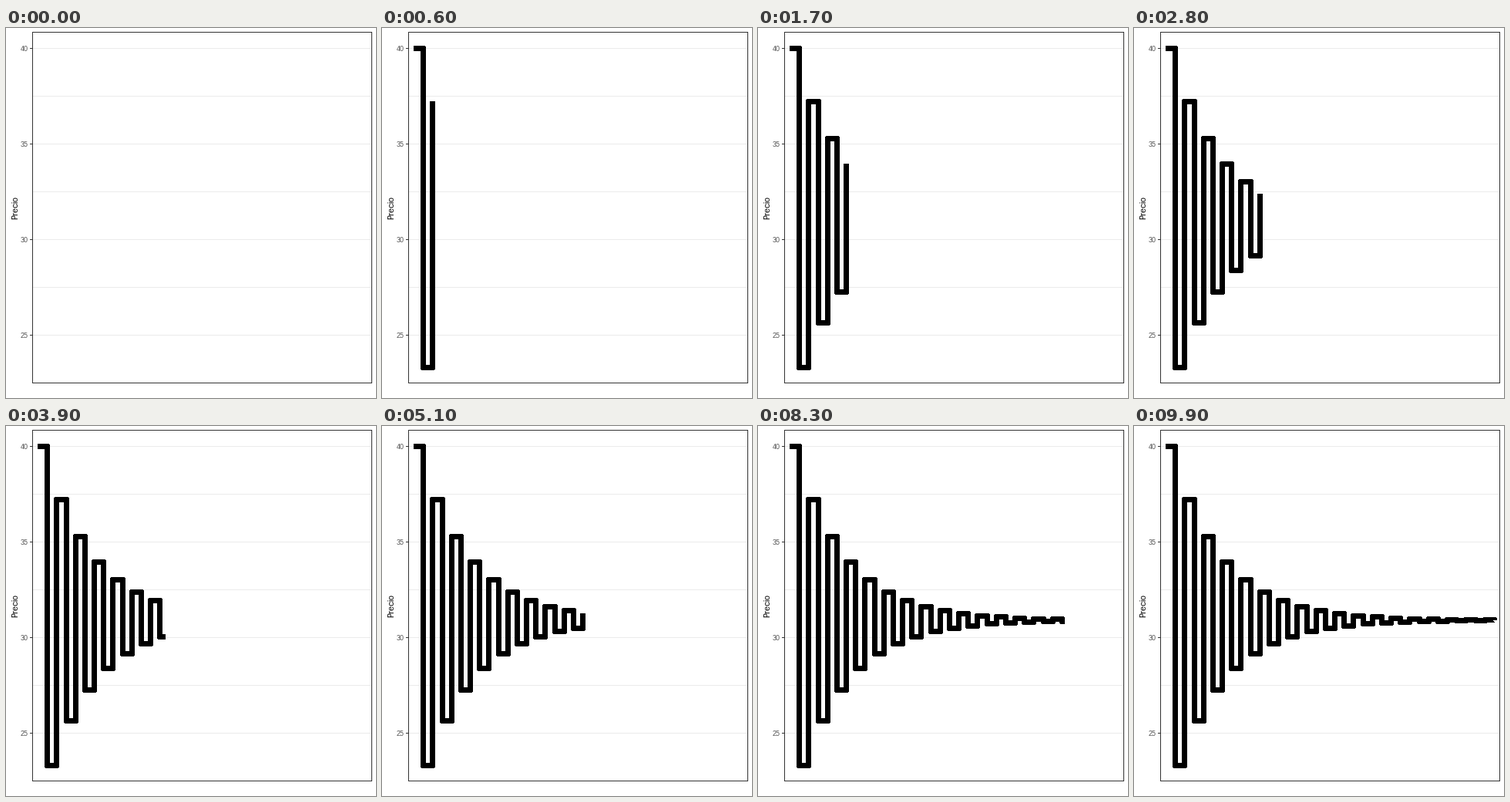
A matplotlib script that plays this animation: 480 px wide and 480 px high, repeating every 10 s.

```python
import numpy as np
import matplotlib.pyplot as plt
from matplotlib.animation import FuncAnimation
from matplotlib.patches import Rectangle

SIZE, DPI = 480, 96
PX = 72 / DPI  # points per pixel
FRAMES, INTERVAL = 100, 100
PERIODS = 35
LEFT, TOP, RIGHT, BOTTOM = 34.5, 5.5, 474.5, 460.5

plt.rcParams.update({
    "path.simplify": False,
    "font.family": ["Liberation Sans", "DejaVu Sans"],
    "text.hinting": "default",  # the font's own hints, on whole pixels
    "text.hinting_factor": 1,
})

# Cobweb model: the price swings around equilibrium, shrinking by 5/6 each period
periods = np.arange(PERIODS + 1)
equilibrium = 340 / 11
prices = equilibrium + (40 - equilibrium) * (-5 / 6) ** periods

# Each period is completed on a whole frame
reveal = np.rint(periods * (FRAMES - 1) / PERIODS)


def to_x(period):
    return np.rint(41 + 12.171 * period)


def to_y(price):
    return np.rint(25.92 + (40 - price) * 24.8175)


def staircase(frame):
    t = np.interp(frame, reveal, periods)
    done = int(t + 1e-9)
    pts = [(to_x(0), to_y(prices[0]))]
    for i in range(1, done + 1):
        pts += [(to_x(i), to_y(prices[i - 1])), (to_x(i), to_y(prices[i]))]
    moving = t - done > 1e-6
    if moving:
        pts.append((to_x(t), to_y(prices[done])))
    pts = np.array(pts) + 0.5
    # Flat ends sit on pixel edges
    pts[0, 0] -= 0.5
    pts[-1, 0 if moving else 1] -= 0.5
    return pts


fig = plt.figure(figsize=(SIZE / DPI, SIZE / DPI), dpi=DPI, facecolor="white")
ax = fig.add_axes([0, 0, 1, 1])
ax.set_xlim(0, SIZE)
ax.set_ylim(SIZE, 0)
ax.axis("off")


def thin_line(x0, x1, y, color, z):
    ax.plot([x0, x1], [y, y], color=color, lw=PX, antialiased=False,
            solid_capstyle="butt", snap=False, zorder=z)


for price in np.arange(25, 40.1, 2.5):
    y = to_y(price) + 0.5
    thin_line(LEFT, RIGHT, y, "#ebebeb", 1)
    if price % 5 == 0:
        thin_line(31, LEFT, y, "#333333", 3)
        ax.text(29, y + 3.5, f"{price:.0f}", size=9 * PX, color="#4d4d4d",
                ha="right", va="baseline")

ax.text(15, 233, "Precio", size=11 * PX, color="black", rotation=90,
        rotation_mode="anchor", ha="center", va="baseline")
ax.add_patch(Rectangle((LEFT, TOP), RIGHT - LEFT, BOTTOM - TOP, fill=False,
                       ec="#333333", lw=PX, antialiased=False, snap=False,
                       zorder=4))

path, = ax.plot([], [], color="black", lw=7 * PX, antialiased=False, snap=False,
                solid_capstyle="butt", solid_joinstyle="round", zorder=2)


def update(frame):
    if frame == 0:
        path.set_data([], [])
    else:
        path.set_data(*staircase(frame).T)
    return path,


anim = FuncAnimation(fig, update, frames=FRAMES, interval=INTERVAL,
                     repeat=True, repeat_delay=0, blit=False)
plt.show()
```
